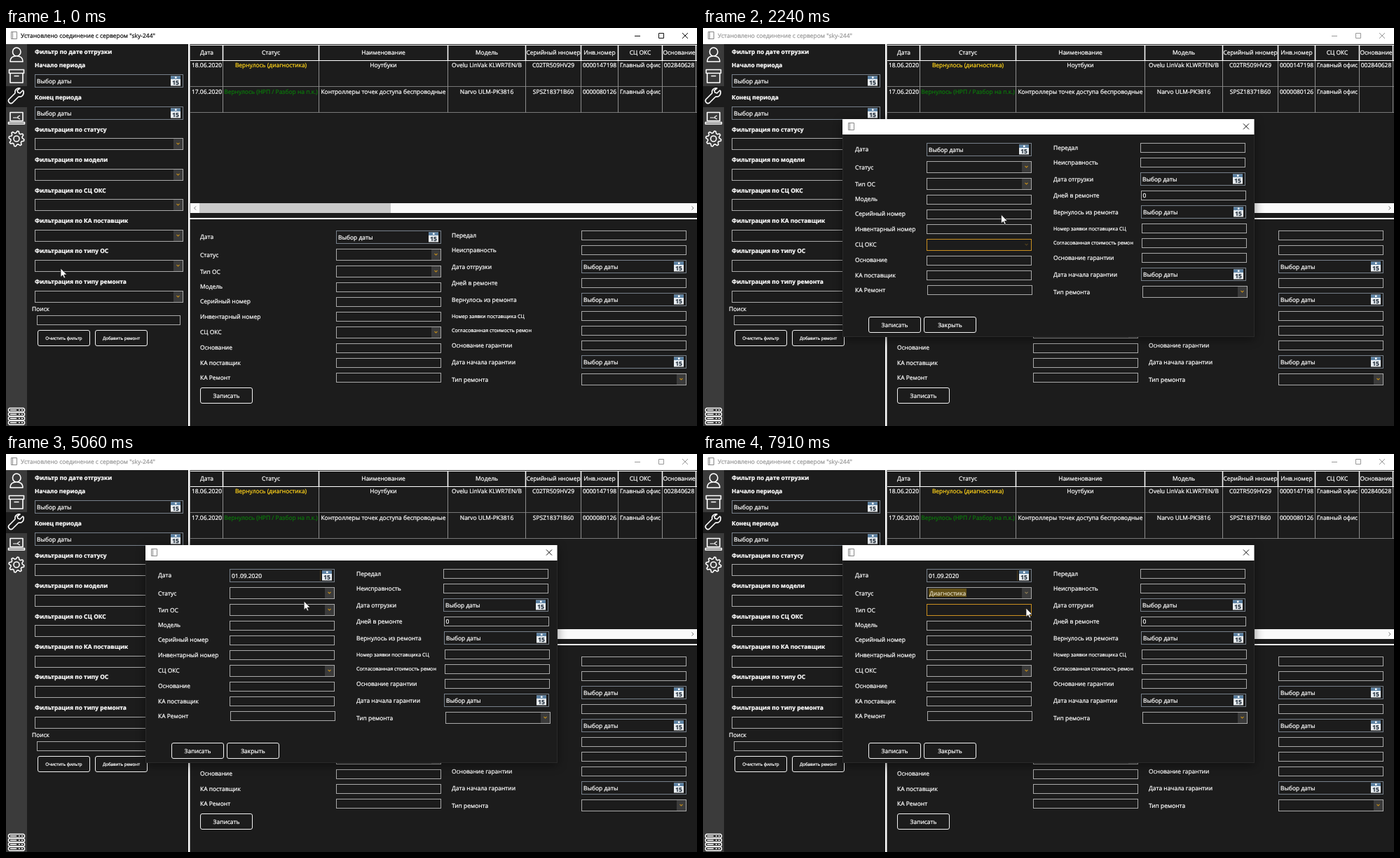
Recreate the animation shown at these times as an HTML page. Size 986x568 px, loop 8000 ms.

```html
<!DOCTYPE html>
<html lang="ru">
<head>
<meta charset="utf-8">
<style>
html, body { margin: 0; width: 100%; height: 100%; overflow: hidden; background: #1c1c1c; }
svg { display: block; width: 100%; height: 100%; }
text { font: 8.45px "Open Sans", "Noto Sans", sans-serif; stroke-width: .24px; white-space: pre; text-rendering: geometricPrecision; }
#panel { filter: drop-shadow(0 3px 7px rgba(0, 0, 0, .45)); }
</style>
</head>
<body>
<svg id="stage" viewBox="0 0 986 568"></svg>
<script>
const LOOP = 8000, BG = '#1c1c1c', LINE = '#a9a9a9', GOLD = '#bd8a1c';
const PICK = 'Выбор даты';

// Drawing helpers; text is placed by the middle of its capitals.
const fill = (x, y, x2, y2, c, more = '') =>
  `<rect x="${x}" y="${y}" width="${x2 - x}" height="${y2 - y}" fill="${c}" ${more}/>`;
const frame = (x, y, x2, y2, c = LINE, more = '') =>
  `<rect x="${x + .5}" y="${y + .5}" width="${x2 - x - 1}" height="${y2 - y - 1}" fill="${BG}" stroke="${c}" ${more}/>`;
const path = (d, c, w = 1, more = '') =>
  `<path d="${d}" fill="none" stroke="${c}" stroke-width="${w}" ${more}/>`;
const text = (s, x, cy, o = {}) => {
  const size = o.size || 8.45, color = o.color || '#fff';
  return `<text x="${x}" y="${cy + size * .36}" ${o.id ? `id="${o.id}"` : ''} text-anchor="${o.mid ? 'middle' : 'start'}" ` +
    `style="font-size:${size}px;font-weight:${o.weight || 400};fill:${color};stroke:${color}">${s}</text>`;
};
const group = (id, s, more = '') => `<g id="${id}" ${more}>${s}</g>`;
const chevron = (x, y, c) => path(`M${x - 2} ${y - 1}l2 2l2 -2`, c, 1.1);

function combo(x, y, x2, c = GOLD, button = '#3b3b3b') {
  const y2 = y + 17;
  return frame(x, y, x2, y2) + fill(x2 - 14, y + 1, x2 - 1, y2 - 1, button) + chevron(x2 - 7.5, y + 8, c);
}
function comboHover(id, x, y, x2) {
  return group(id, frame(x, y, x2, y + 17, '#c98f20') + chevron(x2 - 7.5, y + 8, '#4d3d1c'), 'opacity="0"');
}
function datePicker(x, y, x2, id) {
  const l = x2 - 18, t = y + 2.5;
  return frame(x, y, x2, y + 19, '#77808a') + text(PICK, x + 3, y + 9.7, { id }) +
    fill(l, t, l + 14, t + 14, '#e9eef2') + fill(l, t, l + 14, t + 4.5, '#5d82a3') +
    fill(l + 6, t + 1, l + 8.5, t + 3.5, '#fff') +
    text('15', l + 7, t + 9.5, { mid: 1, size: 8.4, weight: 700, color: '#2b3743' });
}
function button(label, x, y, size) {
  return frame(x, y, x + 75, y + 23, '#f2f2f2', 'rx="2.5"') + text(label, x + 37.5, y + 11.7, { mid: 1, size });
}

// Both forms share their fields; only the offsets differ.
const LEFT = [['Дата', 298, 'd', 289], ['Статус', 324, 'c', 315], ['Тип ОС', 348, 'c', 339],
  ['Модель', 369, 't', 363], ['Серийный номер', 390, 't', 384], ['Инвентарный номер', 411.5, 't', 405],
  ['СЦ ОКС', 434, 'c', 426], ['Основание', 456, 't', 450], ['КА поставщик', 478, 't', 471], ['КА Ремонт', 499, 't', 492]];
const RIGHT = [['Передал', 296, 't', 289, 0], ['Неисправность', 317, 't', 310, 0], ['Дата отгрузки', 340.5, 'd', 331, 0],
  ['Дней в ремонте', 364, 't', 357, 1], ['Вернулось из ремонта', 387.5, 'd', 378, 1],
  ['Номер заявки поставщика СЦ', 411, 't', 404, 2, 7.1], ['Согласованная стоимость ремон', 431, 't', 425, 2, 7.1],
  ['Основание гарантии', 453, 't', 446, 2], ['Дата начала гарантии', 477, 'd', 467.5, 1], ['Тип ремонта', 501.5, 'c', 493, 3]];

function control(kind, x, y, id) {
  y = Math.floor(y);
  if (kind === 'd') return datePicker(x, y, x + 150, id);
  return kind === 'c' ? combo(x, y, x + 150) : frame(x, y, x + 150, y + 14);
}
function form(dialog) {
  const dy = dialog ? -125 : 0;
  const [lx, cx, rx, ex] = dialog ? [217, 319, 500, 624] : [277, 471, 636, 821];
  let s = '';
  LEFT.forEach(([label, ty, kind, y], i) => {
    s += text(label, lx, ty + dy) + control(kind, cx + (dialog && i === 9 ? 1 : 0), y + dy, dialog && !i ? 'date' : '');
  });
  RIGHT.forEach(([label, ty, kind, y, drift, size]) => {
    s += text(label, rx, ty + dy, { size }) + control(kind, ex + (dialog ? drift : 0), y + dy);
  });
  return s;
}

const docIcon = (x, y) => path(`M${x + .5} ${y + .5}h8v10h-8zM${x + 2.5} ${y + .5}v10`, '#888');
const cross = (x, y) => `M${x - 4} ${y - 4}l8 8M${x + 4} ${y - 4}l-8 8`;

function sidebar() {
  const gear = Array.from({ length: 32 }, (_, i) => {
    const a = (i + .5) * Math.PI / 16, r = i % 4 < 2 ? 11 : 8.3;
    return `${(15 + r * Math.cos(a)).toFixed(1)} ${(158 + r * Math.sin(a)).toFixed(1)}`;
  }).join('L');
  let s = fill(0, 23, 30, 568, '#3b3b3b') + fill(0, 83, 30, 113, BG);
  const d = 'M15 28a5.5 5.5 0 0 1 0 12a5.5 6 0 0 1 0 -12M6 48c0 -6 4 -8 9 -8s9 2 9 8z' +
    'M4.5 59.5h21v5h-21zM6 64.5v13.5h18v-13.5M11.5 68.5h7' +
    'M24 89l-4 4l-3 -1l-1 -3l4 -3c-4 -1 -8 2 -7 7l-9 9c-2 3 2 7 5 5l9 -9c5 1 8 -3 7 -8z' +
    'M6 120.5h18v12h-18zM3.5 134.5h23v2.5h-23z' +
    `M${gear}zM19 158a4 4 0 1 1 -8 0a4 4 0 1 1 8 0`;
  s += path(d, '#fff', 1.6, 'stroke-linejoin="round"') + path('M10 128h7M20 125l-3 1.5v2l3 1.5', '#fff', 1.2);
  for (let y = 542.5; y < 562; y += 6)
    s += path(`M5 ${y}h20l1.5 1.5v2.500l-1.5 1.5h-20l-1.5 -1.5v-2.500zM6 ${y + 2.8}h9M18 ${y + 2.8}h2M22 ${y + 2.8}h2`, '#fff', 1.4);
  return s;
}

function filters() {
  const bold = (s, y) => text(s, 41, y, { weight: 700, size: 8.4 });
  let s = bold('Фильтр по дате отгрузки', 34) + bold('Начало периода', 53) + datePicker(41, 66, 253) +
    bold('Конец периода', 99) + datePicker(41, 112, 253);
  ['статусу', 'модели', 'СЦ ОКС', 'КА поставщик', 'типу ОС', 'типу ремонта'].forEach((name, i) => {
    s += bold('Фильтрация по ' + name, 145 + i * 43.3) + combo(41, Math.round(157 + i * 43.5), 253);
  });
  return s + text('Поиск', 37, 401) + frame(44, 410, 249, 424) + button('Очистить фильтр', 45, 431, 6.2) +
    button('Добавить ремонт', 127, 431, 6.2) +
    group('addHover', fill(128, 432, 201, 453, '#5e5c57', 'rx="2"') +
      text('Добавить ремонт', 164.5, 442.7, { mid: 1, size: 6.2 }), 'opacity="0"');
}

function table() {
  const edges = [263, 309, 446, 630, 741, 820, 873, 936, 984];
  const rows = [
    ['Дата', 'Статус', 'Наименование', 'Модель', 'Серийный нномер', 'Инв.номер', 'СЦ ОКС', 'Основание'],
    ['18.06.2020', 'Вернулось (диагностика)', 'Ноутбуки', 'Ovelu LinVak KLWR7EN/B', 'C02TR509HV29', '0000147198', 'Главный офис', '002840628'],
    ['17.06.2020', 'Вернулось (НРП / Разбор на п.к.)', 'Контроллеры точек доступа беспроводные', 'Narvo ULM-PK3816', 'SPSZ18371B60', '0000080126', 'Главный офис', '']];
  let s = path('M263 83.5H986M263 120.5H986', '#777');
  edges.slice(1).forEach(x => { s += path(`M${x + .5} 47V121`, '#8c8c8c') + path(`M${x + .5} 24V47`, '#fff', 1.5); });
  s += path('M263 24.5H986M263 46.5H986', '#fff', 1.2);
  rows.forEach((row, r) => row.forEach((v, c) => {
    const color = c === 1 ? ['#fff', '#ffd21a', '#0b780b'][r] : '#fff';
    s += text(v, (edges[c] + edges[c + 1]) / 2 + .5, [35, 53, 90.5][r], { mid: 1, color });
  }));
  return s + fill(263, 250, 986, 264, '#fafafa') + fill(276, 250, 549, 264, '#cacaca') +
    path('M271 254.5l-2.5 2.5l2.5 2.5M978.5 254.5l2.5 2.5l-2.5 2.5', '#777');
}

function mainWindow() {
  return fill(0, 0, 986, 568, BG) + fill(0, 0, 986, 23, '#fff') + docIcon(7, 5) +
    group('caption', text('Установлено соединение с сервером "sky-244"', 21, 11, { color: 'currentColor' }) +
      path(`M897 11.5h8M931.5 7.5h7v7h-7z${cross(969, 11)}`, 'currentColor')) +
    sidebar() + filters() + table() + fill(260, 23, 262.5, 568, '#fff') +
    fill(262, 271, 986, 273, '#fff') + form(false) + button('Записать', 277, 513);
}

const COL = 15.6, ROW = 11.6, DAYX = 342, DAYY = 230;
function calendar() {
  let s = frame(322.5, 183.5, 454.5, 304.5, '#fff', 'stroke-width="2" rx="1"') +
    fill(329, 187, 346, 203, '#262626') + fill(432, 187, 453, 203, '#2b2b2b') +
    path('M339 192.500l-3 2.500l3 2.500M439 192.500l3 2.500l-3 2.500', '#3e3e3e') +
    text('Сентябрь 2020', 389, 194.7, { mid: 1, size: 7.4, weight: 700 }) +
    fill(0, 0, 15.5, 12, '#5b656b', 'id="dayHover"') +
    fill(381, 259, 397, 271, '#93a3a6') + frame(381, 259, 397, 271, '#b3c1c4', 'fill-opacity="0"');
  ['Пн', 'Вт', 'Ср', 'Чт', 'Пт', 'Сб', 'Вс'].forEach((d, i) => {
    s += text(d, DAYX + i * COL, 216, { mid: 1, size: 7.2, color: '#444' });
  });
  for (let i = 0; i < 42; i++) {
    const day = i < 1 ? 31 : (i - 1) % 30 + 1;
    s += text(day, DAYX + i % 7 * COL, DAYY + Math.floor(i / 7) * ROW, { mid: 1, size: 7.2, weight: 600 });
  }
  return s;
}

function dropdown() {
  const items = ['Диагностика', 'Подготовка к отправке', 'Отгружено в ремонт', 'Вернулось (отказ)', 'Вернулось (диагностика)',
    'Вернулось (исправно)', 'Вернулось (НРП / Разбор на п.к.)', 'Вернулось (ремонт по средствам замены)', 'Вернулось (неисправно)'];
  return frame(320, 207, 501, 343, '#555') + fill(321, 208, 500, 223, '#454545', 'id="itemHover"') +
    items.map((s, i) => text(s, 324, 215 + i * 15)).join('');
}

function dialog() {
  return group('panel', frame(199, 130, 787, 441, '#2a2a2a')) + fill(199, 130, 786.5, 152, '#fff') + docIcon(207, 135) +
    path(cross(775, 140.5), '#111') + form(true) + text('0', 627.5, 239) +
    group('dateEdge', path('M448.500 166V181', '#4a3b1c')) +
    comboHover('statusHover', 319, 190, 469) + comboHover('typeHover', 319, 214, 469) + comboHover('centerHover', 319, 301, 469) +
    group('chosen', combo(319, 190, 469, '#8b7a55') + fill(322, 192, 376, 204, '#604e16') +
      text('Диагностика', 323, 198.5, { color: '#ddd5bd' })) +
    fill(322, 192, 323, 204, '#fff', 'id="caret"') +
    button('Записать', 236, 412) + button('Закрыть', 315, 412) +
    group('calendar', calendar()) + group('list', dropdown());
}

const stage = document.getElementById('stage');
stage.innerHTML = mainWindow() + group('dialog', dialog()) +
  group('cursor', '<path d="M0 0V12.500L2.900 9.800L4.800 14L6.700 13.200L4.900 9.100H8.900Z" fill="#fff" stroke="#111" stroke-width=".7"/>');
const el = {};
stage.querySelectorAll('[id]').forEach(n => { el[n.id] = n; });

// Pointer path: time, x, y. Equal neighbours are rests.
const KEYS = [[0, 78, 343], [280, 78, 343], [400, 132, 394], [550, 184, 446], [2010, 184, 446], [2120, 315, 370],
  [2240, 425, 267], [2390, 464, 200], [2540, 468, 185], [2810, 455, 173], [2900, 455, 173], [3010, 457, 175],
  [3480, 457, 175], [3520, 457, 176], [3690, 457, 176], [4050, 408, 206], [4390, 359, 231], [4700, 359, 231],
  [5000, 414, 214], [5310, 460, 196], [5830, 460, 196], [6100, 416, 207], [6380, 366, 214], [7330, 366, 214],
  [7620, 418, 218], [7910, 461, 220], [8000, 461, 220]];

function slope(i, k) {
  const a = KEYS[i - 1], p = KEYS[i], b = KEYS[i + 1];
  const rest = q => q[1] === p[1] && q[2] === p[2];
  return !a || !b || rest(a) || rest(b) ? 0 : (b[k] - a[k]) / (b[0] - a[0]);
}
function pointer(t) {
  let i = 0;
  while (i < KEYS.length - 2 && t >= KEYS[i + 1][0]) i++;
  const a = KEYS[i], b = KEYS[i + 1], d = b[0] - a[0], u = (t - a[0]) / d;
  const s = u * u * (3 - 2 * u);
  return [1, 2].map(k => a[k] + (b[k] - a[k]) * s +
    d * u * (1 - u) * ((1 - u) * slope(i, k) - u * slope(i + 1, k)));
}
const ramp = (t, a, b) => Math.min(1, Math.max(0, (t - a) / (b - a)));
const pulse = (t, a, b, c, d) => ramp(t, a, b) - ramp(t, c, d);
const show = (id, on) => { el[id].style.display = on ? '' : 'none'; };
const fade = (id, v) => el[id].setAttribute('opacity', v);

function draw(t) {
  const [x, y] = pointer(t);
  el.cursor.setAttribute('transform', `translate(${x.toFixed(2)} ${y.toFixed(2)})`);
  el.caption.style.color = t < 1360 ? '#111' : '#999';
  fade('addHover', pulse(t, 460, 540, 1500, 1700));

  const open = 1 - (1 - ramp(t, 1450, 1700)) ** 3, scale = .92 + .08 * open;
  show('dialog', t >= 1450);
  fade('dialog', open);
  el.dialog.setAttribute('transform', `translate(${492 * (1 - scale)} ${285 * (1 - scale)}) scale(${scale})`);

  fade('centerHover', pulse(t, 2170, 2200, 2260, 2360));
  fade('typeHover', pulse(t, 2280, 2310, 2350, 2440) + pulse(t, 7330, 7420, 9000, 9100));
  fade('statusHover', pulse(t, 2360, 2390, 2440, 2530) + pulse(t, 5150, 5220, 6900, 6930));

  const cal = t >= 3190 && t < 4640;
  show('calendar', cal);
  fade('calendar', ramp(t, 3160, 3260));
  const col = Math.round((x - DAYX) / COL), row = Math.round((y - DAYY) / ROW);
  show('dayHover', cal && col >= 0 && col < 7 && row >= 0 && row < 6);
  el.dayHover.setAttribute('x', DAYX + col * COL - 7.7);
  el.dayHover.setAttribute('y', DAYY + row * ROW - 6);

  el.date.textContent = t < 4640 ? PICK : '01.09.2020';
  show('dateEdge', t >= 4640);
  show('list', t >= 5520 && t < 6900);
  show('itemHover', y > 207);
  show('caret', t >= 5520 && t < 6900 && Math.floor((t - 5520) / 505) % 2 === 0);
  show('chosen', t >= 6900);
}

function tick() {
  draw(performance.now() % LOOP);
  requestAnimationFrame(tick);
}
tick();
</script>
</body>
</html>
```
